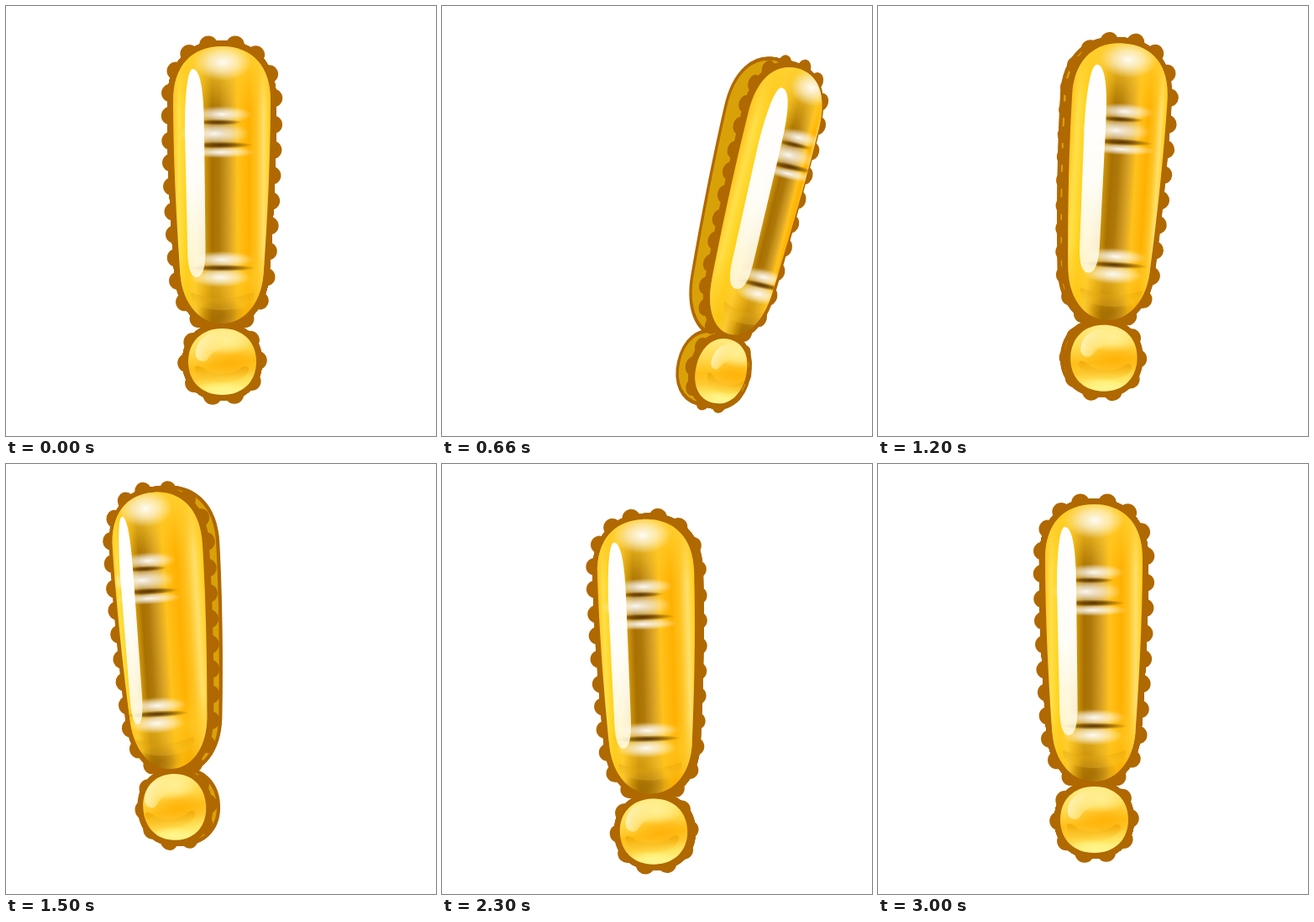
Recreate the animation shown at these times as an HTML page with a canvas. Size 512 px wide and 512 px high, loop 3.02 s.

```html
<!DOCTYPE html>
<html lang="en">
<head>
<meta charset="utf-8">
<title>Golden exclamation mark</title>
<style>
  html, body { margin: 0; width: 100%; height: 100%; overflow: hidden; background: #fff; }
  canvas { display: block; width: 512px; height: 512px; }
</style>
</head>
<body>
<canvas id="stage" width="512" height="512"></canvas>
<script>
const ctx = document.getElementById('stage').getContext('2d');
const LOOP = 3020, STEP = 20, RAD = Math.PI / 180;
const MID_X = 257, MID_Y = 255.5, HALF_W = 58, DEPTH = 28, BULGE = 33;
const BROWN = '#b06800', SIDE = '#d9a108';

// Turning points [ms, value]; between them the motion eases like a pendulum
const SWING = [[0, 0], [710, 114], [1780, -100], [2600, 28], [3000, 0]];
const BOB = [[0, 0], [340, -26], [830, 33], [1400, -18], [1980, 26], [2720, 0]];
const TILT = [[120, 0], [880, 16], [1360, -1], [1880, -13], [2440, 0.5], [3000, 0]];

function swing(keys, t) {
  const i = keys.findIndex(k => k[0] > t);
  if (i === 0) return keys[0][1];
  if (i < 0) return keys[keys.length - 1][1];
  const [t0, a] = keys[i - 1], [t1, b] = keys[i];
  return a + (b - a) * (1 - Math.cos(Math.PI * (t - t0) / (t1 - t0))) / 2;
}

// Right half of the body outline, top to bottom, x measured from the axis
const HALF = [
  [0, 48, 36, 48, 58, 72, 58, 112],
  [58, 112, 58, 180, 54, 260, 49.5, 320],
  [49.5, 320, 46, 358, 24, 378, 0, 378]
];

function addBody(path) {
  path.moveTo(0, 48);
  for (const [, , a, b, c, d, x, y] of HALF) path.bezierCurveTo(a, b, c, d, x, y);
  for (const [x, y, a, b, c, d] of [...HALF].reverse()) path.bezierCurveTo(-c, d, -a, b, -x, y);
  path.closePath();
}

function addDot(path) {
  const cx = 0.5, cy = 423.5, rx = 40.5, ry = 39.5, k = 0.6;
  path.moveTo(cx, cy - ry);
  path.bezierCurveTo(cx + rx * k, cy - ry, cx + rx, cy - ry * k, cx + rx, cy);
  path.bezierCurveTo(cx + rx, cy + ry * k, cx + rx * k, cy + ry, cx, cy + ry);
  path.bezierCurveTo(cx - rx * k, cy + ry, cx - rx, cy + ry * k, cx - rx, cy);
  path.bezierCurveTo(cx - rx, cy - ry * k, cx - rx * k, cy - ry, cx, cy - ry);
  path.closePath();
}

// Points along the half outline moved outwards, with their normals
function rim(offset) {
  const pts = [];
  let len = 0;
  for (const p of HALF) {
    for (let u = 0; u < 1; u += 0.01) {
      const v = 1 - u;
      const at = k => v * v * v * p[k] + 3 * v * v * u * p[k + 2] + 3 * v * u * u * p[k + 4] + u * u * u * p[k + 6];
      const der = k => v * v * (p[k + 2] - p[k]) + 2 * v * u * (p[k + 4] - p[k + 2]) + u * u * (p[k + 6] - p[k + 4]);
      const m = Math.hypot(der(0), der(1)), nx = der(1) / m, ny = -der(0) / m;
      const x = at(0) + nx * offset, y = at(1) + ny * offset;
      const last = pts[pts.length - 1];
      if (last) len += Math.hypot(x - last.x, y - last.y);
      pts.push({ x, y, nx, ny, len });
    }
  }
  return pts;
}

function addCircle(path, x, y, r) {
  path.moveTo(x + r, y);
  path.arc(x, y, r, 0, Math.PI * 2);
}

function makeBumps() {
  const path = new Path2D(), pts = rim(8), total = pts[pts.length - 1].len;
  for (const [side, count] of [[1, 13], [-1, 14]]) {
    for (let i = 0; i < count; i++) {
      const want = 16 + (total - 48) * i / (count - 1);
      const p = pts.find(q => q.len >= want);
      addCircle(path, side * (p.x - 4.5 * p.nx), p.y - 4.5 * p.ny, 10.8);
    }
  }
  for (let deg = -38; deg < 220; deg += 36) {
    addCircle(path, 0.5 + 42 * Math.cos(deg * RAD), 423.5 + 41.5 * Math.sin(deg * RAD), 11.3);
  }
  return path;
}

const body = new Path2D(), dot = new Path2D(), outline = new Path2D();
addBody(body);
addDot(dot);
addBody(outline);
addDot(outline);
const bumps = makeBumps();
const streak = new Path2D('M-34.500 75C-25 75-21 105-21 150L-19.500 285C-19 312-23 323-30 323C-38 323-41 308-41 285L-44 150C-44 105-41 75-34.500 75Z');
const bodyCrescent = new Path2D('M-37 341Q0 355 38 341Q40 352 27 358Q0 366-26 358Q-38 352-37 341Z');
const dotCrescent = new Path2D('M-32 429Q-27 427-20 433Q0 443 20 433Q28 426 32 431Q33 439 22 444Q0 453-22 444Q-33 439-32 429Z');
const dotStreak = new Path2D('M-31 412C-30 398-17 388-3 390C8 394 2 409-9 412C-15 415-16 424-23 423C-29 422-32 418-31 412Z');

function ramp(x0, y0, x1, y1, stops) {
  const g = ctx.createLinearGradient(x0, y0, x1, y1);
  for (const [at, color] of stops) g.addColorStop(at, color);
  return g;
}

function glow(x, y, rx, ry, rgb, alpha) {
  ctx.save();
  ctx.translate(x, y);
  ctx.scale(rx, ry);
  const g = ctx.createRadialGradient(0, 0, 0, 0, 0, 1);
  g.addColorStop(0, `rgba(${rgb},${alpha})`);
  g.addColorStop(0.5, `rgba(${rgb},${alpha * 0.6})`);
  g.addColorStop(1, `rgba(${rgb},0)`);
  ctx.fillStyle = g;
  ctx.fillRect(-1, -1, 2, 2);
  ctx.restore();
}

function shifted(dx, paint) {
  ctx.save();
  ctx.translate(dx, 0);
  paint();
  ctx.restore();
}

function grow(path, margin, color) {
  ctx.fillStyle = ctx.strokeStyle = color;
  ctx.lineWidth = margin * 2;
  ctx.fill(path);
  ctx.stroke(path);
}

function extrude(dx, margin, color) {
  for (let i = 0; i <= 20; i++) shifted(dx * i / 20, () => grow(outline, margin, color));
}

// Sideways drift of a point on the rounded front when it turns
const drift = (x, tan) => BULGE * tan * (1 - (x / HALF_W) ** 2);

function drawBody(tan) {
  const follow = ([at, color]) => {
    const x = (at * 2 - 1) * HALF_W;
    return [Math.min(1, Math.max(0, at + drift(x, tan) / (2 * HALF_W))), color];
  };
  ctx.save();
  ctx.clip(body);
  ctx.fillStyle = ramp(-HALF_W, 0, HALF_W, 0, [
    [0, '#ffc420'], [0.06, '#ffe04a'], [0.15, '#ffd014'], [0.23, '#ffd23c'], [0.32, '#d29a0c'],
    [0.4, '#a87000'], [0.47, '#ae780a'], [0.58, '#d9a326'], [0.66, '#ffc21c'], [0.78, '#ffb000'],
    [0.86, '#ffc322'], [0.93, '#ffe06c'], [1, '#ffcc10']
  ].map(follow));
  ctx.fillRect(-60, 40, 120, 345);
  ctx.fillStyle = ramp(0, 48, 0, 125, [[0, 'rgba(255,208,48,1)'], [0.35, 'rgba(255,204,40,.75)'], [1, 'rgba(255,200,32,0)']]);
  ctx.fillRect(-60, 40, 120, 85);
  ctx.fillStyle = ramp(0, 290, 0, 378, [[0, 'rgba(255,200,32,0)'], [0.4, 'rgba(255,202,36,.6)'], [0.7, 'rgba(250,190,24,.45)'], [1, 'rgba(225,155,0,.1)']]);
  ctx.fillRect(-60, 290, 120, 90);

  const white = '255,255,255', dark = '90,52,0';
  shifted(drift(0, tan), () => {
    glow(0, 368, 28, 22, '150,98,0', 0.6);
    glow(1, 67, 35, 22, white, 0.95);
    glow(0, 129, 36, 10, white, 0.95);
    glow(-9, 152, 42, 14, white, 0.95);
    glow(-2, 174, 42, 7, white, 0.95);
    glow(0, 302, 38, 10, white, 0.95);
    glow(-2, 323, 36, 12, white, 0.95);
    glow(-4, 138.5, 28, 3.5, dark, 0.95);
    glow(-1, 165.5, 38, 4, dark, 1);
    glow(0, 312, 40, 4, dark, 1);
  });

  shifted(drift(40, tan), () => {
    ctx.fillStyle = ramp(0, 340, 0, 362, [[0, 'rgba(215,150,0,.35)'], [1, 'rgba(255,205,50,.25)']]);
    ctx.fill(bodyCrescent);
  });

  // the streak widens or narrows as it drifts over the curve
  const sx = -32.5;
  shifted(sx + drift(sx, tan), () => {
    ctx.scale(1 - 2 * sx * BULGE * tan / HALF_W ** 2, 1);
    ctx.translate(-sx, 0);
    ctx.fillStyle = ramp(0, 75, 0, 323, [[0, '#fff'], [0.55, 'rgba(255,255,255,.96)'], [1, 'rgba(255,252,235,.82)']]);
    ctx.fill(streak);
  });
  ctx.restore();
}

function drawDot(tan) {
  ctx.save();
  ctx.clip(dot);
  ctx.fillStyle = ramp(-8, 384, 4, 463, [
    [0, '#ffeb80'], [0.3, '#ffda50'], [0.55, '#ffbf18'], [0.7, '#ffc830'], [0.85, '#ffe560'], [1, '#fff48c']
  ]);
  ctx.fillRect(-50, 380, 100, 90);
  ctx.translate(14 * tan, 0);
  glow(10, 424, 36, 19, '255,172,0', 0.65);
  glow(6, 398, 32, 18, '255,243,160', 0.85);
  ctx.fillStyle = ramp(0, 428, 0, 450, [[0, 'rgba(236,160,0,.75)'], [1, 'rgba(255,215,60,.3)']]);
  ctx.fill(dotCrescent);
  glow(0, 456, 30, 9, '255,250,150', 0.7);
  ctx.fillStyle = ramp(-32, 404, 0, 412, [[0, 'rgba(255,246,200,.9)'], [1, 'rgba(255,232,130,.25)']]);
  ctx.fill(dotStreak);
  ctx.restore();
}

function draw(t) {
  const dy = swing(BOB, t);
  const yaw = 0.38 * swing(SWING, t - 30) * RAD, tan = Math.tan(yaw);
  ctx.setTransform(1, 0, 0, 1, 0, 0);
  ctx.fillStyle = '#fff';
  ctx.fillRect(0, 0, 512, 512);
  ctx.translate(MID_X + swing(SWING, t), MID_Y + dy);
  ctx.rotate(swing(TILT, t) * RAD);
  ctx.scale(Math.cos(yaw), 1 - Math.max(0, dy) * 0.0006);
  ctx.translate(0, -MID_Y);
  ctx.lineJoin = 'round';

  extrude(-DEPTH * tan, 7, BROWN);
  if (Math.abs(tan) > 0.02) extrude(-DEPTH * tan, 2.5, SIDE);

  // the front leans a little further out towards the top
  const lean = 0.03 * tan;
  ctx.transform(1, 0, -lean, 1, lean * 400, 0);
  shifted(-5 * tan, () => {
    grow(outline, 6.5, BROWN);
    ctx.fill(bumps);
  });
  drawBody(tan);
  drawDot(tan);
}

const start = performance.now();
function tick() {
  const t = (performance.now() - start) % LOOP;
  draw(Math.floor(t / STEP) * STEP);
  requestAnimationFrame(tick);
}
tick();
</script>
</body>
</html>
```
